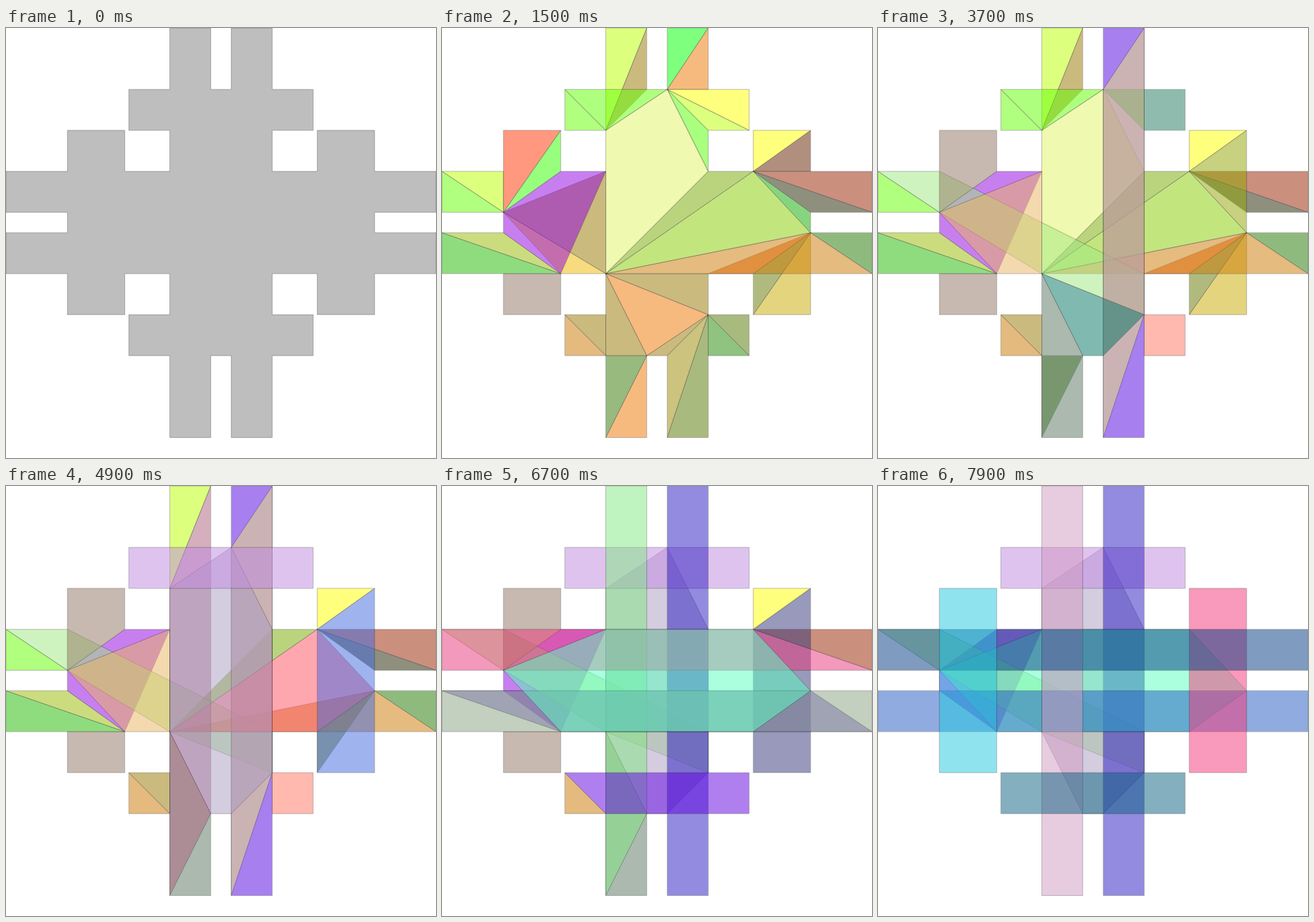
Recreate the animation shown at these times as an HTML page. Size 600x600 px, loop 8000 ms.

```html
<!DOCTYPE html>
<html lang="en">
<head>
<meta charset="utf-8">
<title>Convex cover</title>
<style>
html, body { margin: 0; width: 100%; height: 100%; overflow: hidden; background: #fff; }
svg { display: block; width: 100vw; height: 100vh; }
polygon { stroke: #000; stroke-width: .018; opacity: .5; }
.outline { stroke-opacity: .5; opacity: 1; }
</style>
</head>
<body>
<svg id="stage" viewBox="0 0 21 21"></svg>
<script>
const LOOP = 8000, HOLD = 500, STEP = 200;
const stage = document.getElementById('stage');
const pieces = [];

// The outline is one quarter, mirrored; only the lower legs are one unit longer.
const quarter = [
  [11, 3], [11, 0], [13, 0], [13, 3], [15, 3], [15, 5], [13, 5], [13, 7],
  [15.2, 7], [15.2, 5], [18, 5], [18, 7], [21, 7], [21, 9], [18, 9]
];
const flipX = ([x, y]) => [21 - x, y];
const flipY = ([x, y]) => [x, y ? 19 - y : 20];
const lower = quarter.map(flipY);
const ring = [
  ...quarter, ...[...lower].reverse(),
  ...lower.map(flipX), ...quarter.map(flipX).reverse()
];

function polygon(points, fill) {
  const el = document.createElementNS('http://www.w3.org/2000/svg', 'polygon');
  el.setAttribute('points', points.join(' '));
  el.setAttribute('fill', fill);
  stage.append(el);
  return el;
}

function add(points, fill, from) {
  pieces.push({ el: polygon(points, fill), points, from, until: Infinity });
}

const turn = (a, b, c) =>
  (b[0] - a[0]) * (c[1] - a[1]) - (b[1] - a[1]) * (c[0] - a[0]);

function halfHull(points) {
  const chain = [];
  for (const p of points) {
    while (chain.length > 1 && turn(chain.at(-2), chain.at(-1), p) <= 1e-9) chain.pop();
    chain.push(p);
  }
  return chain.slice(0, -1);
}

function hull(points) {
  const sorted = [...points].sort((a, b) => a[0] - b[0] || a[1] - b[1]);
  return [...halfHull(sorted), ...halfHull(sorted.reverse())];
}

// Triangles from one corner to each pair of neighbours; tones are red-green digits.
function fan(hub, corners, tones) {
  const tone = tones.split(' ');
  for (let i = 1; i < corners.length; i++) {
    const tri = [hub, corners[i - 1], corners[i]].map(k => ring[k % ring.length]);
    if (Math.abs(turn(...tri)) > 1e-6) add(tri, `#${tone.shift()}0`, 1);
  }
}

const upTo = (hub, last) => Array.from({ length: last - hub }, (_, i) => hub + 1 + i);

const outline = polygon(ring, '#bebebe');
outline.setAttribute('class', 'outline');

fan(0, upTo(0, 7), '0f e7 ff bf 5f');
fan(8, upTo(8, 15), 'ff 62 92 22 1a');
fan(15, upTo(15, 22), '27 c9 ca 67 e5');
fan(23, upTo(23, 30), '57 28 57 98 97');
fan(30, upTo(30, 33), 'e7 37');
fan(33, upTo(33, 37), 'c7 97');
fan(38, upTo(38, 45), '97 b7 2b 9b c9');
fan(45, upTo(45, 52), '6f bf f3 3f 5c');
fan(53, upTo(53, 60), '6f 6f bf 97 5f');
fan(45, [52, 37, 38], '97 eb');
fan(53, [0, 7], '9d');
fan(37, [53, 7, 8, 15, 22, 23, 30, 33], 'dc 7a 8c c7 97 e7 97');

// Each step replaces two pieces by their convex hull, laid on top.
let step = 2;
function merge(a, b, fill) {
  const pair = [pieces[a], pieces[b]];
  for (const p of pair) p.until = step;
  add(hull(pair.flatMap(p => p.points)), fill, step++);
}

merge(35, 38, '#61ff01');
merge(41, 42, '#e1f561');
merge(24, 25, '#917561');
merge(33, 28, '#9101e1');
merge(45, 11, '#cd7901');

merge(30, 46, '#a1e981');
merge(48, 20, '#597561');
merge(0, 17, '#5101e1');
merge(1, 18, '#3008e0');
merge(2, 3, '#217961');

merge(6, 9, '#91a501');
merge(31, 32, '#917561');
merge(39, 40, '#ebb561');
merge(57, 4, '#f0e878');
merge(19, 47, '#017561');
merge(15, 16, '#ff7561');

merge(44, 14, '#ff5161');
merge(37, 21, '#ad617d');
merge(50, 63, '#ab9bc1');
merge(49, 34, '#a1b9a1');
merge(68, 58, '#c189e1');
merge(59, 12, '#4169e1');

merge(36, 66, '#81e981');
merge(56, 62, '#2919c1');
merge(70, 13, '#353579');
merge(26, 10, '#89a181');
merge(27, 53, '#7c78a8');
merge(29, 8, '#e93579');
merge(64, 23, '#6101e1');
merge(65, 43, '#c1a181');
merge(61, 78, '#59ffc1');

merge(74, 75, '#2159c1');
merge(71, 55, '#d199c1');
merge(73, 5, '#f53579');
merge(76, 7, '#013981');
merge(77, 22, '#096181');
merge(60, 51, '#21c9e1');

const start = performance.now();
const show = (el, on) => { el.style.display = on ? '' : 'none'; };

function draw() {
  const t = (performance.now() - start) % LOOP;
  const now = t < HOLD ? 0 : 1 + Math.floor((t - HOLD) / STEP);
  show(outline, now === 0);
  for (const p of pieces) show(p.el, now >= p.from && now < p.until);
  requestAnimationFrame(draw);
}
draw();
</script>
</body>
</html>
```
